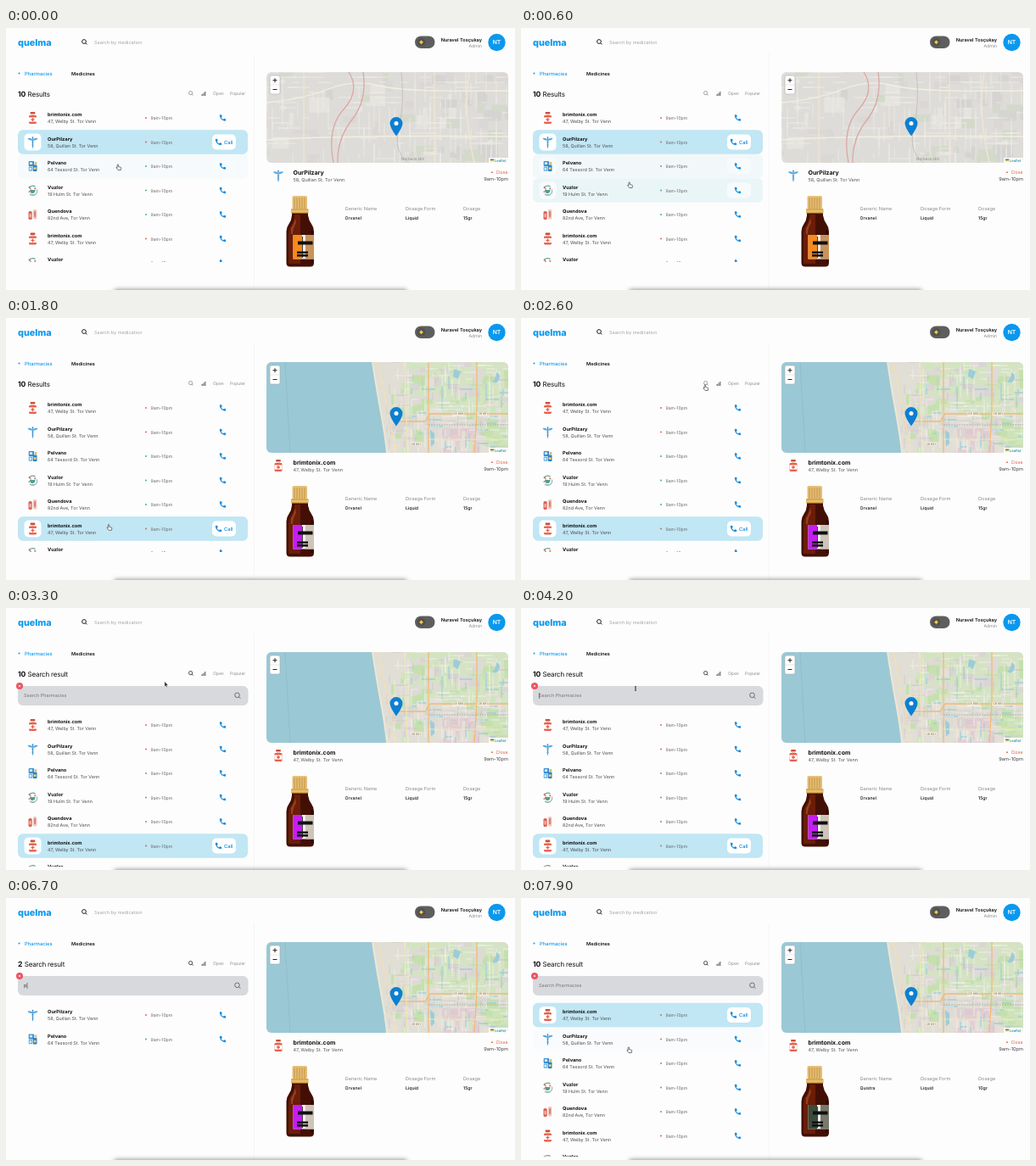
Recreate the animation shown at these times as an HTML page. Size 600 by 309 pixels, loop 8000 ms.

```html
<!DOCTYPE html>
<html lang="en">
<head>
<meta charset="utf-8">
<title>Pharmacy finder</title>
<style>
  html, body { margin: 0; width: 100%; height: 100%; overflow: hidden; background: #fdfdfd; }
  svg { display: block; width: 600px; height: 309px; font-family: Inter, "Open Sans", sans-serif; }
  text { text-rendering: geometricPrecision; }
</style>
</head>
<body>
<svg id="stage" viewBox="0 0 600 309"></svg>
<script>
const BLUE = '#0a98ee', INK = '#111', GRAY = '#8b8b8b', RED = '#e4573d', GREEN = '#3aa76d';
const LOOP = 8000, PITCH = 28.5;

// SVG string helpers
const rect = (x, y, w, h, fill, r = 0, more = '') =>
  `<rect x="${x}" y="${y}" width="${w}" height="${h}" rx="${r}" fill="${fill}" ${more}/>`;
const dot = (x, y, r, fill, more = '') => `<circle cx="${x}" cy="${y}" r="${r}" fill="${fill}" ${more}/>`;
const text = (x, y, s, size, fill = INK, more = '') =>
  `<text x="${x}" y="${y}" font-size="${size}" fill="${fill}" ${more}>${s}</text>`;
const line = (d, color, w, more = '') =>
  `<path d="${d}" fill="none" stroke="${color}" stroke-width="${w}" ${more}/>`;
const shape = (d, fill, more = '') => `<path d="${d}" fill="${fill}" ${more}/>`;
const lens = (x, y, r, color, w, id = '') =>
  `<g ${id} fill="none" stroke="${color}" stroke-width="${w}"><circle cx="${x}" cy="${y}" r="${r}"/>` +
  `<path d="M${x + r * .7} ${y + r * .7}l${r * .7} ${r * .7}"/></g>`;
const bold = 'font-weight="700"', semi = 'font-weight="600" ', mid = 'font-weight="500"', end = 'text-anchor="end"';

let seed = 7;
const rnd = () => (seed = (seed * 16807) % 2147483647) / 2147483647;

const shops = [
  { name: 'brimtonix.com', place: '47, Welby St. Tor Venn', icon: 0, map: 2, open: false },
  { name: 'OurPilzary', place: '58, Quillan St. Tor Venn', icon: 1, map: 0, open: false },
  { name: 'Pelvano', place: '64 Tessord St. Tor Venn', icon: 2, map: 0, open: true },
  { name: 'Vuzlor', place: '19 Hulm St. Tor Venn', icon: 3, map: 1, open: true },
  { name: 'Quendova', place: '82nd Ave, Tor Venn', icon: 4, map: 1, open: true }
];
const list = [0, 1, 2, 3, 4, 0, 3, 4, 0, 3].map(i => shops[i]);

// medicine shown for a chosen row: name, dose, label colours
const drugs = {
  0: ['Quistra', '10gr', '#3c4a3c', '#77796c'],
  1: ['Orvanel', '15gr', '#f58a1f', '#c9935c'],
  3: ['Zulmor', '5gr', '#174fe0', '#cfd3d8'],
  5: ['Orvanel', '15gr', '#c51df2', '#cfc4b8']
};

// timed states and cursor path
const picks = [[0, 1], [750, 3], [1520, 5], [7500, 0]];
const typing = [[0, ''], [4700, 'p'], [4900, 'pe'], [5100, 'pel'], [5250, 'pelv'], [5450, 'pelva'],
  [6300, 'pelv'], [6400, 'pel'], [6500, 'pe'], [6600, 'p'], [6900, '']];
const path = [[-100, 135, 140], [0, 133, 164], [500, 130, 181], [750, 127, 191], [1000, 125, 205], [1300, 121, 239],
  [1500, 120, 247], [1800, 122, 247], [2400, 215, 92], [2600, 218, 82], [3000, 218, 82], [3600, 160, 98],
  [4200, 135, 95], [6950, 135, 95], [7300, 128, 141], [7860, 128, 145], [7900, 128, 179], [8000, 129, 183]];

const icons = [
  rect(-2.8, -7, 5.6, 2.6, '#c9503f', .6) + rect(-2, -4.4, 4, 1.4, '#f0c9b0') +
    rect(-4.5, -3, 9, 10, '#e8604e', 1.4) + rect(-4.5, -.6, 9, 5.2, '#fff') +
    line('M0 0v4M-2 2h4', '#e8604e', 1.3),
  line('M0 -5V7', '#2583c6', .8) + dot(0, -5.4, .9, '#2583c6') +
    shape('M0 -3.200Q-3 -5 -6 -4.600Q-5 -2 0 -1.800Q5 -2 6 -4.600Q3 -5 0 -3.200', '#5ba9de') +
    line('M-1.500 -1Q2.200 .8 0 2.200Q-2.200 3.600 .6 5.400M1.500 -1Q-2.200 .8 0 2.200Q2.200 3.600 -.6 5.400', '#3b93d2', .6),
  rect(-4.8, -6, 6.5, 6, '#3b8fce', .8) + rect(-3.6, -4.8, 3.2, 2.8, '#cfe9f5') +
    rect(-4.8, .5, 4.4, 5.2, '#6fb4e0', .6) + rect(.2, -1.5, 4.8, 7.5, '#2f83c0', .8) +
    dot(2.6, 2.4, 1.5, '#f2d26b') + rect(2.6, -5, 2.2, 3, '#e8b65a', .5) + rect(-3.700, 2, 2, 2.2, '#fff'),
  line('M-4.500 -2.500A5 5 0 0 1 3 -4.500', '#58a897', 1.2) + line('M4.800 -1A5 5 0 0 1 -3.500 4.200', '#94b8b4', 1.2) +
    shape('M-3.500 -.5H3Q2.800 3.500 -.3 3.500T-3.500 -.5', '#4f9d93') + line('M-2 -1L-4.500 -4.500', '#d46a5c', 1.2) +
    dot(2.8, -2.2, 1.1, '#e07062') + dot(-4.2, 1.6, .9, '#e07062') + rect(-3, 4.6, 6, 1, '#94b8b4'),
  rect(-5, -4, 4.2, 10, '#dc6259', 1.6) + rect(-4, -1, 2.2, 4.5, '#f3b5a8', .8) +
    rect(.4, -6, 4.4, 11.5, '#ecc9bb', 1.6) + rect(1.5, -4, 2.2, 7, '#d8837b', 1)
];

const phone = shape('M6.6 10.8c1.4 2.8 3.8 5.1 6.6 6.6l2.2-2.2c.3-.3.7-.4 1-.2 1.1.4 2.3.6 3.6.6.6 0 1 .4 1 1V20c0 .6-.4 1-1 1-9.4 0-17-7.6-17-17 0-.6.4-1 1-1h3.5c.6 0 1 .4 1 1 0 1.3.2 2.5.6 3.6.1.3 0 .7-.2 1z',
  '#0b86dc', 'transform="scale(.38) translate(-12 -12)" stroke="#0b86dc"');

const row = (s, i) => `<g id="row${i}">
  ${rect(14, -14.2, 271, 28.4, '#dff0f5', 6, 'class="hover"')}
  ${rect(14, -14.2, 271, 28.4, '#c1e6f4', 6, 'class="sel"')}
  <g class="box">${rect(21.5, -10, 20, 20, '#fff', 5)}${rect(243, -9, 28, 18, '#fff', 5)}</g>
  <use href="#icon${s.icon}" x="31.500" y="0"/>
  ${text(49, -2, s.name, 5.7, INK, bold)}
  ${text(49, 6, s.place, 5.4, '#4c4c4c')}
  ${dot(165, 0, .9, s.open ? GREEN : RED)}
  ${text(170.5, 2, '9am-10pm', 5.1, '#666')}
  <g class="phone">${phone}</g>
  ${text(257, 2.2, 'Call', 5.8, '#0b86dc', mid + ' class="call"')}
</g>`;

// Random grid streets inside a box
function streets(n, x0, x1, color, w, step = 5, reach = 30) {
  let d = '';
  for (let i = 0; i < n; i++) {
    const x = x0 + Math.floor(rnd() * (x1 - x0) / step) * step, y = 52 + Math.floor(rnd() * 107 / step) * step;
    d += `M${x} ${y}${rnd() < .5 ? 'h' : 'v'}${6 + Math.round(rnd() * reach)}`;
  }
  return line(d, color, w);
}
function patches(n, x0, x1, colors, size = 20) {
  let s = '';
  for (let i = 0; i < n; i++)
    s += rect(x0 + rnd() * (x1 - x0), 50 + rnd() * 102, 4 + rnd() * size, 4 + rnd() * size * .7, colors[i % colors.length], 1);
  return s;
}
const road = (x, y, s) => rect(x - 6.5, y - 2.6, 13, 4.2, '#fdf3dc', 1) + text(x, y + .7, s, 3.4, '#555', 'text-anchor="middle"');

const maps = [
  rect(307, 52, 285, 107, '#dedcd8') +
    patches(60, 300, 590, ['#d5d4d2', '#e6e4df', '#d3dacb', '#dbd7d5']) +
    streets(170, 302, 592, '#efeeeb', .7, 6) +
    line('M307 88Q350 84 380 72T440 68T592 74M307 132Q400 126 592 128', '#f3efdf', 1.3) +
    line('M351 52V159M505 52V159M546 52Q538 100 552 159', '#f1e7cf', 1.3) +
    line('M421 52Q426 85 408 108T391 159M386 159Q378 118 398 96T404 52', '#dba7a5', 1.3) +
    line('M466 52Q470 90 463 118T475 159', '#b9b7b5', .7) +
    text(466, 156, 'Norbeck Hill', 4.6, '#8c8a89'),
  rect(307, 52, 285, 107, '#d4d3d0') +
    patches(14, 307, 580, ['#d0cfcc', '#d8d7d4']) +
    streets(24, 307, 592, '#dfdedb', .7, 14) +
    line('M307 100H592M352 52V159M470 52V159', '#dddcd8', 1) +
    line('M440 52Q420 76 410 98T388 159M447 52Q426 80 417 100T396 159', '#e4e1de', 1.2) +
    line('M536 52Q525 76 540 90T528 122T541 159', '#c5cbcd', 1.4) +
    text(415, 136, 'Tallow Park', 4.4, '#bab9b6'),
  rect(307, 52, 285, 107, '#e0ded5') +
    rect(473, 52, 119, 62, '#d5e3c4') + rect(563, 128, 29, 31, '#cde3ba') + rect(514, 130, 44, 29, '#e2cdd2') +
    patches(110, 446, 590, ['#dedad5', '#c5e0ae', '#e4e0d8', '#cfe5bd', '#d9d6d2'], 13) +
    streets(34, 470, 592, '#a3d0d8', 1.3, 4, 12) +
    streets(110, 458, 592, '#f8f7f2', .6, 4, 16) + streets(70, 446, 592, '#bdb9b2', .4, 3, 12) +
    shape('M578 64q6 3 3 9t-8 2q5-4 5-11M528 60l8 3-3 9-6-3zM500 132l5 4v12l-4 3z', '#9bcdd8') +
    shape('M307 52H432Q437 85 442 112T449 159H307Z', '#9bc8d5') +
    line('M329 52L335 159', '#7fa6b8', .5, 'stroke-dasharray="2 1"') +
    line('M432 52Q437 85 442 112T449 159', '#efe8d2', 1.8) +
    line('M439 52Q446 90 452 118T458 159', '#f6dfae', 1.1) +
    line('M462 122H494L500 113H592M498 52V159M555 52V113L552 159', '#f0ba78', 1.3) +
    line('M470 52L473 159M498 143H592', '#f3e6b4', 1) +
    line('M498 126H592', '#8a8a86', .5, 'stroke-dasharray="2 1"') +
    road(533, 113.5, 'CR 866') + road(562, 113.5, 'CR 881') + road(483, 149, 'CR 851')
];

const bottle = shape('M337 218H356V221Q357 227 360 231Q363 235 363 240V277Q363 281.500 358.500 281.500H335Q330.500 281.500 330.500 277V240Q330.500 235 333.500 231Q336.500 227 337 221Z', '#430f05') +
  shape('M340 220V224Q338 231 335 235Q333 238 333 242V278H347V220Z', '#6b1d08') +
  shape('M341 224Q339 232 336 236V243H338Q338 236 342 230Z', '#93401f') +
  rect(359.5, 238, 2, 39, '#2b0804', 1) +
  rect(337.5, 198, 17.5, 15, '#e6bf78', 1.5) +
  line('M340 200v13M343 200v13M346 200v13M349 200v13M352 200v13', '#b98936', .8) +
  rect(336, 213, 20.5, 5.5, '#d9a94e', 1) + rect(336, 215.5, 20.5, 1, '#f0d59c') +
  rect(338.5, 244, 24.500, 28.5, '#efefec') +
  rect(338.5, 244, 10.5, 28.5, 'red', 0, 'id="labelLeft"') + rect(353, 244, 10, 28.5, 'red', 0, 'id="labelRight"') +
  line('M349.500 246V271', '#151515', .8) +
  rect(344, 251.5, 17.5, 4, '#101010') + rect(343, 263.5, 13, 2.4, '#101010') + rect(343, 267, 13, 2.6, '#101010');

const $ = id => document.getElementById(id);
$('stage').innerHTML = `
<defs>
  ${icons.map((s, i) => `<g id="icon${i}">${s}</g>`).join('')}
  <clipPath id="listClip">${rect(0, 91, 292, 185, '#000', 0, 'id="listArea"')}</clipPath>
  <clipPath id="mapClip">${rect(307, 52, 285, 107, '#000', 6)}</clipPath>
  <filter id="blur" x="-10%" y="-200%" width="120%" height="500%"><feGaussianBlur stdDeviation="2.500"/></filter>
</defs>
${rect(0, 0, 600, 309, '#fdfdfd')}${rect(292, 30, .7, 279, '#f3f3f3')}
${text(14, 20.8, 'quelma', 10.8, BLUE, 'font-weight="800"')}
${lens(92, 16, 2.4, '#222', 1)}${text(104, 18.8, 'Search by medication', 5.5, '#a5a5a5')}
${rect(482, 9.5, 23.5, 14.5, '#5e5e5e', 7.2)}${dot(489.5, 16.8, 5, '#525252')}${dot(489.5, 16.8, 1.8, '#f6c945')}
${line('M489.500 14.200V19.400M486.900 16.800H492.100', '#f6c945', .6)}
${text(561, 15.5, 'Nuravel Tosçukay', 5.6, INK, semi + end)}${text(561, 23, 'Admin', 5.2, GRAY, end)}
${dot(578.5, 17, 10.2, BLUE)}${text(578.5, 19.4, 'NT', 6.8, '#fff', semi + 'text-anchor="middle"')}
${dot(15.5, 53.5, 1, BLUE)}${text(22, 55.6, 'Pharmacies', 5.8, BLUE, mid)}${text(77, 55.6, 'Medicines', 5.6, INK, semi)}
<text x="14" y="80.800" font-size="8" letter-spacing="-.2" fill="${INK}"><tspan id="count" font-size="8.600" font-weight="700"></tspan><tspan id="heading" dx="2.500"></tspan></text>
${lens(217.6, 76.6, 2.1, GRAY, .8, 'id="finder"')}
${rect(230.5, 78, 1.3, 2, '#777')}${rect(232.3, 76.6, 1.3, 3.4, '#777')}${rect(234.1, 75, 1.3, 5, '#777')}
${text(244, 79.4, 'Open', 5, GRAY)}${text(264, 79.4, 'Populer', 5, GRAY)}
<g clip-path="url(#listClip)">${list.map(row).join('')}</g>
<g id="search">
  ${rect(14, 92, 271.5, 23, '#d7d9dc', 6)}${lens(272.5, 102.8, 2.8, '#555', .8)}
  ${text(21, 105.4, '', 5.5, '#555', 'id="query"')}${rect(21, 100, .6, 7, '#333', 0, 'id="caret"')}
  ${dot(16, 92, 4, '#ea5560')}${line('M14.800 90.800l2.400 2.400m0-2.400l-2.400 2.400', '#fff', .7)}
</g>
<g clip-path="url(#mapClip)">${maps.map((m, i) => `<g id="map${i}">${m}</g>`).join('')}
  ${rect(569, 153, 23, 6, '#fff', 0, 'opacity=".85"')}
  ${rect(571, 154.6, 4.2, 1.4, '#3d77c8')}${rect(571, 156, 4.2, 1.4, '#f3d33a')}${text(576, 157.6, 'Leaflet', 4.1, '#0078a8')}
</g>
${rect(311, 56, 12, 22, '#fff', 2, 'stroke="#aaa" stroke-width=".6"')}
${line('M311 67H323', '#ccc', .5)}${line('M314.500 61.700h5M317 59.200v5M314.500 72.500h5', '#222', 1)}
${shape('M460 127.500Q452.500 117 452.500 112.500A7.500 7.500 0 0 1 467.500 112.500Q467.500 117 460 127.500Z', '#0c7fd2')}${dot(460, 112.5, 2.5, '#fff')}
<use id="bigIcon" x="321" y="174"/>
${text(338.5, 173, '', 7, INK, bold + ' id="shop"')}${text(338.5, 181.4, '', 5.5, '#555', 'id="place"')}
${dot(573, 170.2, .9, RED, 'id="light"')}${text(591.5, 172, '', 5.2, RED, end + ' id="status"')}
${text(592, 180, '9am-10pm', 5.7, '#444', end)}
${bottle}
${['Generic Name', 'Dosage Form', 'Dosage'].map((s, i) => text([399.5, 471, 539][i], 215, s, 5.6, GRAY)).join('')}
${text(399.5, 226, '', 5.2, INK, mid + ' id="drug"')}${text(471, 226, 'Liquid', 5.2, INK, mid)}${text(539, 226, '', 5.2, INK, mid + ' id="dose"')}
<g filter="url(#blur)">${rect(127, 308, 346, 8, '#999', 4)}</g>
<g id="cursor" stroke-linejoin="round">
  ${shape('M-1.800 -2.500a.7.700 0 0 1 1.400 0V-.4l2.400.6q.8.200.7 1l-.4 2.300H-.9l-2.100-2.600q-.3-.9.600-.7l.6.5z', '#fff', 'id="hand" stroke="#222" stroke-width=".6"')}
  ${shape('M-2 -3.500V2.800L-.6 1.600L.4 3.800L1.400 3.300L.4 1.200H2.300Z', '#222', 'id="arrow" stroke="#fff" stroke-width=".5"')}
  ${line('M-1 -2.600Q0 -2.600 0 -2V2Q0 2.600 -1 2.600M1 -2.600Q0 -2.600 0 -2V2Q0 2.600 1 2.600', '#222', .6, 'id="beam"')}
</g>`;

const clamp = v => Math.max(0, Math.min(1, v));
const ease = v => (v = clamp(v), v * v * (3 - 2 * v));
const set = (id, key, value) => $(id).setAttribute(key, value);
const put = (id, s) => { if ($(id).textContent !== s) $(id).textContent = s; };
const latest = (steps, t) => steps.reduce((last, s, i) => s[0] <= t ? i : last, 0);

function pointer(t) {
  let i = 1;
  while (i < path.length - 1 && path[i][0] < t) i++;
  const [t0, x0, y0] = path[i - 1], [t1, x1, y1] = path[i], k = clamp((t - t0) / (t1 - t0));
  return [x0 + (x1 - x0) * k, y0 + (y1 - y0) * k];
}

const parts = list.map((s, i) => Object.fromEntries(
  ['hover', 'sel', 'box', 'phone', 'call'].map(c => [c, $('row' + i).querySelector('.' + c)])));

function drawRows(t, top, query, now, before, fade) {
  const trail = Array.from({ length: 8 }, (_, k) => pointer(t - k * 30)[1] - 3);
  const typingNow = t > 4500 && t < 7000;
  let shown = 0;
  list.forEach((s, i) => {
    const match = s.name.toLowerCase().includes(query);
    set('row' + i, 'display', match ? 'inline' : 'none');
    if (!match) return;
    const y = top + PITCH * shown++;
    const sel = i === now ? fade : i === before ? 1 - fade : 0;
    const hover = typingNow ? 0 : trail.filter(v => Math.abs(v - y) < PITCH / 2).length / 8;
    const p = parts[i];
    set('row' + i, 'transform', `translate(0 ${y})`);
    p.sel.setAttribute('opacity', sel);
    p.hover.setAttribute('opacity', hover);
    p.box.setAttribute('opacity', Math.max(sel, hover));
    p.call.setAttribute('opacity', sel);
    p.phone.setAttribute('transform', `translate(${255.5 - 5 * sel} 0)`);
  });
  return shown;
}

function drawDetails(now, before, fade) {
  const s = list[now], [drug, dose, left, right] = drugs[now];
  maps.forEach((m, i) => set('map' + i, 'opacity', i === s.map ? fade : 0));
  if (before !== now) {
    const old = list[before].map;
    set('map' + old, 'opacity', old === s.map ? 1 : 1 - fade);
  }
  const color = s.open ? GREEN : RED;
  set('bigIcon', 'href', '#icon' + s.icon);
  put('shop', s.name);
  put('place', s.place);
  put('status', s.open ? 'Open' : 'Close');
  set('status', 'fill', color);
  set('light', 'fill', color);
  put('drug', drug);
  put('dose', dose);
  set('labelLeft', 'fill', left);
  set('labelRight', 'fill', right);
}

function drawCursor(t, top, open) {
  const [x, y] = pointer(t);
  const beam = open > .5 && y > 91 && y < 116;
  const hand = !beam && (y > top - 12 || (y < 86 && Math.abs(x - 218) < 5));
  set('cursor', 'transform', `translate(${x} ${y})`);
  set('cursor', 'display', t > 4600 && t < 6950 ? 'none' : 'inline');
  set('beam', 'display', beam ? 'inline' : 'none');
  set('hand', 'display', hand ? 'inline' : 'none');
  set('arrow', 'display', beam || hand ? 'none' : 'inline');
}

function draw(t) {
  const open = ease((t - 2800) / 350), searching = t >= 2800;
  const top = 106 + 32 * open;
  const query = typing[latest(typing, t)][1];
  const step = latest(picks, t), now = picks[step][1];
  const before = step ? picks[step - 1][1] : now;
  const fade = step ? ease((t - picks[step][0]) / 200) : 1;

  set('listArea', 'height', 185 + 29 * open);
  put('count', String(drawRows(t, top, query, now, before, fade)));
  put('heading', searching ? 'Search result' : 'Results');
  set('finder', 'stroke', searching ? '#222' : GRAY);
  set('search', 'opacity', open);
  put('query', query || 'Search Pharmacies');
  set('query', 'fill', query ? '#333' : '#777');
  set('caret', 'x', 21 + (query ? $('query').getComputedTextLength() + .3 : 0));
  set('caret', 'display', t > 3800 && t < 7450 ? 'inline' : 'none');
  drawDetails(now, before, fade);
  drawCursor(t, top, open);
}

const start = performance.now();
function tick() {
  draw((performance.now() - start) % LOOP);
  requestAnimationFrame(tick);
}
tick();
</script>
</body>
</html>
```
